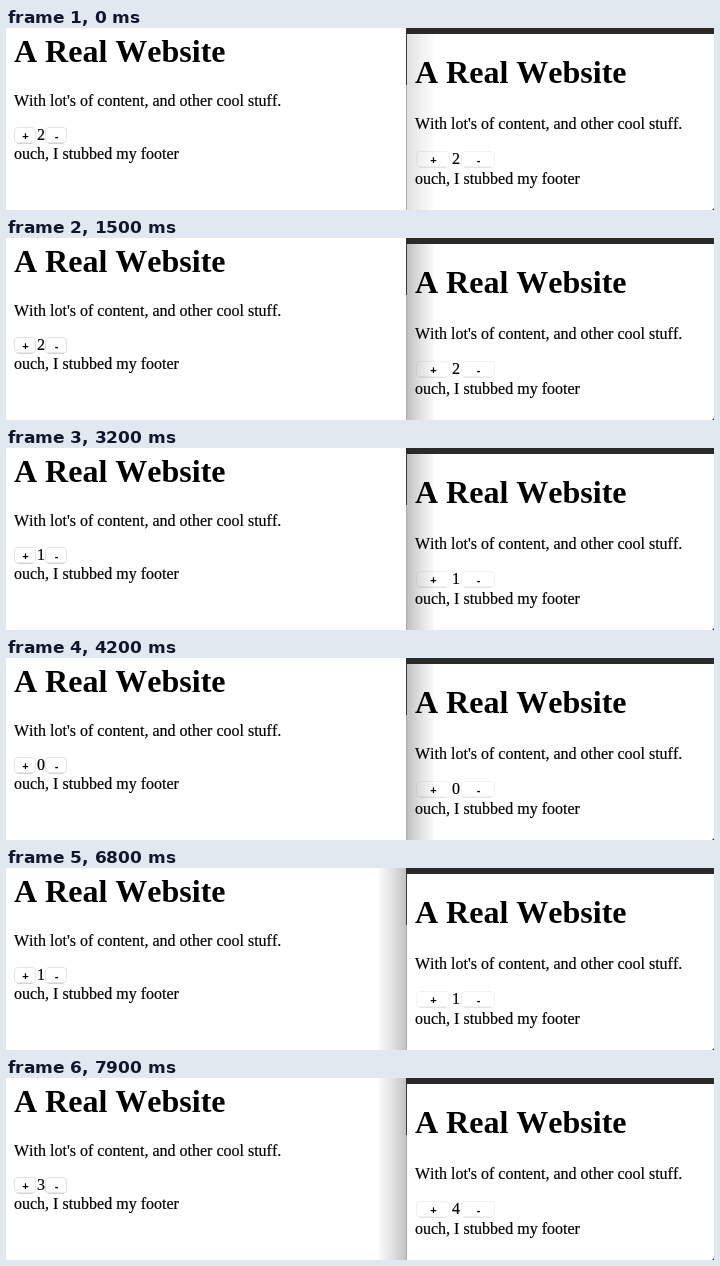
Write an HTML page that moves like this. It is 708 px wide and 182 px high and loops after 8000 ms.

```html
<!DOCTYPE html>
<html>
<head>
<meta charset="utf-8">
<style>
  html, body { margin: 0; width: 100%; height: 100%; overflow: hidden; background: #fff; }
  svg { display: block; }
  text { font: 16px "Liberation Serif", Times, serif; font-kerning: none; stroke: #000; stroke-width: .2; }
  .title { font-size: 32px; font-weight: bold; stroke: none; }
  .sign { font: bold 11px "Liberation Sans", Arial, sans-serif; text-anchor: middle; stroke: none; }
  .face { fill: #fff; stroke: #dcdcdc; stroke-width: .8; }
  .base { stroke: #c4c4c4; stroke-width: .8; }
  #right .face { stroke: #eee; }
  #right .base { stroke: #dedede; }
  .down .face { fill: url(#blue); stroke: #2a78e4; }
  .down .sign { fill: #fff; }
</style>
</head>
<body>
<svg width="708" height="182" viewBox="0 0 708 182">
  <defs>
    <linearGradient id="blue" x2="0" y2="1">
      <stop stop-color="#6cb3fa"/><stop offset="1" stop-color="#1a6cf0"/>
    </linearGradient>
    <linearGradient id="fade">
      <stop stop-opacity=".25"/><stop offset=".5" stop-opacity=".12"/><stop offset="1" stop-opacity=".02"/>
    </linearGradient>
  </defs>
  <g id="left" transform="translate(8 34)"></g>
  <g id="right" transform="translate(409 55)"></g>
  <rect id="rightShadow" x="401" y="6" width="27" height="176" fill="url(#fade)"/>
  <rect id="leftShadow" width="28" height="182" fill="url(#fade)" transform="translate(401) scale(-1 1)"/>
  <path d="M400 0H708V6H400Z" fill="#2b2a2b"/>
  <path d="M400 6h1v51h-1z" fill="#3a3a3a"/>
  <path d="M400 57h1v125h-1z" fill="#aaa"/>
  <path d="M708 180v2h-2z" fill="#333"/>
</svg>
<script>
const LOOP = 8000, POLL = 1000;
const $ = id => document.getElementById(id);

function button(id, x, y, width, sign) {
  return `<g id="${id}"><rect class="face" x="${x}" y="${y}" width="${width}" height="15.5" rx="3.5"/>
    <path class="base" d="M${x + 3} ${y + 15.8}h${width - 6}"/>
    <text class="sign" x="${x + width / 2 + .5}" y="${y + 12}">${sign}</text></g>`;
}

// Positions are relative to the title's baseline; margin is the space around each button.
function buildPage(side, width, margin) {
  const body = 43 + 2 * margin, row = body + 33.5 + margin, footer = row + 18.5 + margin;
  const countX = width + 2 * margin + 1, top = row - 12.5;
  $(side).innerHTML = `
    <text class="title">A Real Website</text>
    <text y="${body}">With lot's of content, and other cool stuff.</text>
    ${button(side + "Plus", margin, top, width, "+")}
    <text id="${side}Count" x="${countX}" y="${row}"></text>
    ${button(side + "Minus", countX + 8 + margin, top, width, "-")}
    <text y="${footer}">ouch, I stubbed my footer</text>`;
}
buildPage("left", 21, .5);
buildPage("right", 33, 1.5);

// A click counts on release: at once on its own page, at the next poll on the other.
const click = (side, sign, start, hold = 100) => ({ side, sign, start, end: start + hold });
const clicks = [
  click("left", "Minus", 2200), click("left", "Minus", 3800),
  click("right", "Plus", 6500), click("right", "Plus", 7000),
  click("right", "Plus", 7400, 200), click("right", "Plus", 7800)
];

function showPage(side, t, pollOffset) {
  const lastPoll = Math.floor((t - pollOffset) / POLL) * POLL + pollOffset;
  let count = 2;
  for (const c of clicks)
    if (c.end <= (c.side === side ? t : lastPoll)) count += c.sign === "Plus" ? 1 : -1;
  $(side + "Count").textContent = count;
  for (const sign of ["Plus", "Minus"])
    $(side + sign).classList.toggle("down", clicks.some(c =>
      c.side === side && c.sign === sign && t >= c.start && t < c.end));
}

function draw(now) {
  const t = now % LOOP;
  showPage("left", t, 800);
  showPage("right", t, 200);
  // The focused window casts its shadow on the other one.
  $("rightShadow").setAttribute("opacity", t < 1500 ? .5 : t < 6000 ? 1 : 0);
  $("leftShadow").setAttribute("opacity", t < 6000 ? 0 : 1);
  requestAnimationFrame(draw);
}
draw(performance.now());
</script>
</body>
</html>
```
